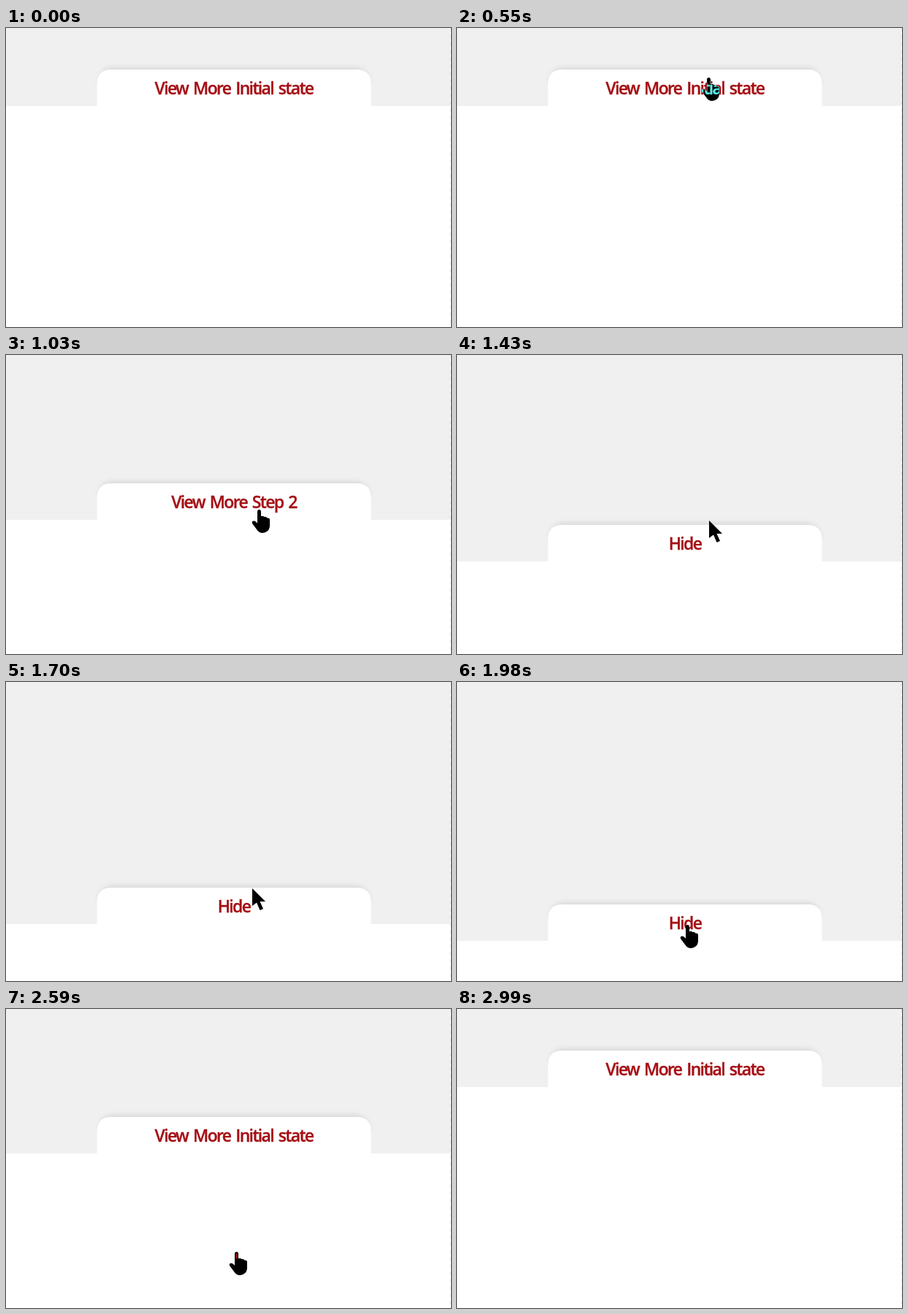
These frames come from a looping animation (609 by 410 pixels, 3.19 s). An HTML page:

```html
<!DOCTYPE html>
<html lang="en">
<head>
<meta charset="utf-8">
<title>View more panel</title>
<style>
  html, body { margin: 0; width: 100%; height: 100%; overflow: hidden; background: #fff; }
  svg { display: block; width: 609px; height: 410px; isolation: isolate; }
  #label {
    font: 600 23px "Open Sans", "Noto Sans", sans-serif;
    letter-spacing: -1.65px;
    word-spacing: 2.5px;
    text-anchor: middle;
    fill: #a50f14;
    stroke: #a50f14;
    stroke-width: .3px;
  }
  .inverted { mix-blend-mode: difference; fill: #fff; }
</style>
</head>
<body>
<svg viewBox="0 0 609 410">
  <defs>
    <filter id="soft" x="-10%" y="-80%" width="120%" height="260%">
      <feGaussianBlur stdDeviation="5"/>
    </filter>
  </defs>
  <rect width="609" height="410" fill="#f0f0f0"/>
  <g id="panel">
    <rect x="129" y="-1" width="366" height="32" rx="16" opacity=".14" filter="url(#soft)"/>
    <rect y="50" width="609" height="410" fill="#fff"/>
    <path d="M124.5 51V20Q124.5 0 144.5 0H479.5Q499.5 0 499.5 20V51Z" fill="#fff"/>
    <text id="label" x="312" y="34"></text>
  </g>
  <path d="M608.5 0V410" stroke="#fff"/>
  <path d="M608.5 0V410" stroke="#e8e8e8" stroke-dasharray="5 5"/>
  <g id="cursor">
    <path id="arrow" d="M0 0V24L6 19.5L10.5 30L15 28L10.5 18H18Z"/>
    <path id="hand" d="M-3 3Q-3 0 -.5 0Q2 0 2 3V9Q5 8 6.5 10Q9 9 10.5 11.5Q14 11 14 14V22Q14 27 10 30Q7 32 4 32Q-1 32 -4 27L-10 19Q-11 15.5 -8 15.5Q-5 15.5 -3 19Z"/>
    <path id="tint" d="M-.5 2.5V9.5" stroke="#a50f14" stroke-width="2"/>
  </g>
</svg>
<script>
const LOOP = 3190;
const STEP = 67.9;
const END = 44 * STEP;

// Moments of the three clicks, and of the cursor leaving.
const OPEN_MORE = 680, OPEN_ALL = 1240, CLOSE = 2420, LEAVE = 2750;

const swing = k => (1 - Math.cos(Math.PI * k)) / 2;
const easeIn = k => k * k;
const easeOut = power => k => 1 - (1 - k) ** power;
const clamp = k => Math.min(1, Math.max(0, k));
const tween = (t, start, duration, ease) => ease(clamp((t - start) / duration));

function panelTop(t) {
  return 57
    + 128 * tween(t, OPEN_MORE, 410, swing)
    + 122 * tween(t, OPEN_ALL, 840, easeOut(2))
    - 250 * tween(t, CLOSE, 560, easeOut(3));
}

function cursorTip(t) {
  const toStep = tween(t, 760, 250, swing);
  const chase = tween(t, 1310, 385, swing);
  const toHide = tween(t, 1700, 270, swing);
  const leave = tween(t, LEAVE, 180, swing);
  return {
    x: 405 - 60 * tween(t, 70, 470, easeIn) + 2 * toStep - 10 * chase - 21 * toHide + 6 * leave,
    y: 200 - 132 * tween(t, 70, 470, swing) + 144 * toStep + 71 * chase + 50 * toHide + 23 * leave
  };
}

function labelAt(t) {
  if (t < OPEN_MORE || t >= CLOSE) return "View More Initial state";
  return t < OPEN_ALL ? "View More Step 2" : "Hide";
}

const $ = id => document.getElementById(id);
const [panel, label, cursor, arrow, hand, tint] =
  ["panel", "label", "cursor", "arrow", "hand", "tint"].map($);

function show(node, visible) {
  node.setAttribute("visibility", visible ? "visible" : "hidden");
}

function draw(now) {
  const t = Math.min(END, Math.floor(now / STEP) * STEP);
  const top = panelTop(t);
  panel.setAttribute("transform", `translate(0 ${Math.round(top)})`);
  label.textContent = labelAt(t);

  const { x, y } = cursorTip(t);
  const alpha = clamp(t / 140) * clamp((2950 - t) / 180);
  // The pointer keeps its shape until the mouse moves away.
  const overTab = y > top + 2 && y < top + 50;
  const isHand = overTab || (t >= CLOSE && t < LEAVE);
  cursor.setAttribute("transform", `translate(${Math.round(x)} ${Math.round(y)})`);
  cursor.setAttribute("opacity", alpha);
  cursor.setAttribute("class", isHand && t < OPEN_MORE ? "inverted" : "");
  show(arrow, !isHand);
  show(hand, isHand);
  show(tint, isHand && t > 1970);
}

const start = performance.now();
function tick() {
  draw((performance.now() - start) % LOOP);
  requestAnimationFrame(tick);
}
tick();
</script>
</body>
</html>
```
